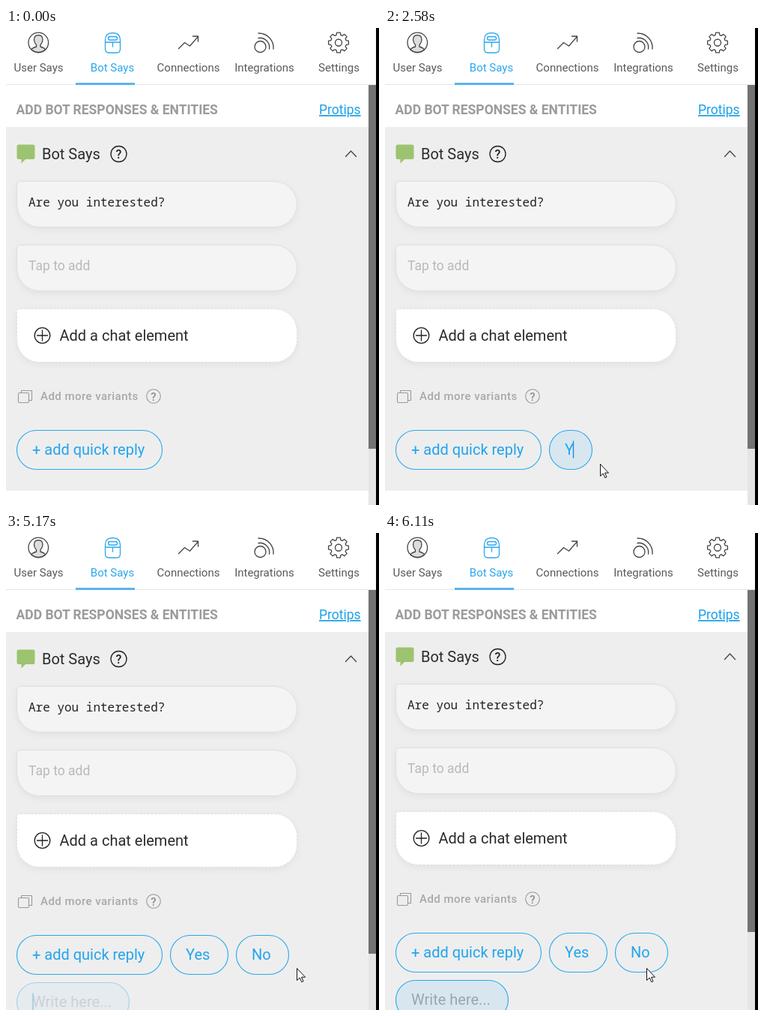
Recreate the animation shown at these times as an HTML page. Size 498 by 636 pixels, loop 6.19 s.

```html
<!DOCTYPE html>
<html lang="en">
<head>
<meta charset="utf-8">
<title>Bot quick replies</title>
<style>
  html, body { margin: 0; width: 100%; height: 100%; overflow: hidden; background: #fff; }
  svg { display: block; width: 498px; height: 636px; font-family: Roboto, Arial, sans-serif; }
  text { white-space: pre; }
  .nav { font-size: 15px; text-anchor: middle; fill: #5a5a5a; }
  .nav .active { fill: #2aa7ee; }
  .icon { fill: none; stroke: #444; stroke-width: 1.3; stroke-linejoin: round; stroke-linecap: round; }
  .big { font-size: 20px; fill: #2b2b2b; }
  .bubble { fill: #f4f4f4; stroke: #dedede; filter: drop-shadow(0 3px 4px rgba(0, 0, 0, .05)); }
  .pill rect { fill: #d8e7ef; stroke: #27a8f0; stroke-width: 1.1; }
  .pill text { font-size: 20px; fill: #21a5ee; }
  .caret { stroke: #1c8fd3; stroke-width: 1.4; }
  .cursor path { stroke-linejoin: round; }
</style>
</head>
<body>
<svg viewBox="0 0 498 636">
  <defs>
    <clipPath id="view"><rect y="132" width="484" height="504"/></clipPath>
  </defs>
  <rect width="498" height="636" fill="#fff"/>

  <g clip-path="url(#view)">
    <g id="page">
      <rect id="panel" y="60" width="484" height="557" fill="#eee"/>
      <path d="M17 155.500H36Q38.500 155.500 38.500 158V172.500Q38.500 175 36 175H26L20.500 180.500V175H17Q14.500 175 14.500 172.500V158Q14.500 155.500 17 155.500Z" fill="#9cc36f"/>
      <text class="big" x="48" y="175">Bot Says</text>
      <g class="icon">
        <circle cx="150.500" cy="168" r="10.500" stroke="#222"/>
        <path d="M453.500 171.500L460.500 164L467.500 171.500"/>
      </g>
      <text x="150.500" y="174" font-size="16" font-weight="500" text-anchor="middle" fill="#222">?</text>

      <path class="bubble" d="M18.500 204.500H358A30.500 30.500 0 0 1 358 265.500H45A30.500 30.500 0 0 1 14.500 235V208.500Q14.500 204.500 18.500 204.500Z"/>
      <text x="30" y="238" font-size="16" fill="#222" style="font-family: 'Noto Sans Mono', monospace">Are you interested?</text>
      <path class="bubble" d="M18.500 289.500H358A30.500 30.500 0 0 1 358 350.500H45A30.500 30.500 0 0 1 14.500 320V293.500Q14.500 289.500 18.500 289.500Z"/>
      <text x="30" y="323" font-size="17.500" fill="#b9b9b9">Tap to add</text>

      <path class="bubble" style="fill: #fff; stroke-dasharray: 3 2" d="M18.500 374.500H358.500A30 30 0 0 1 388.500 404.500V415.500A30 30 0 0 1 358.500 445.500H44.500A30 30 0 0 1 14.500 415.500V378.500Q14.500 374.500 18.500 374.500Z"/>
      <g class="icon" style="stroke: #222">
        <circle cx="48.500" cy="410" r="10.300"/>
        <path d="M41.500 410H55.500M48.500 403V417"/>
      </g>
      <text class="big" x="71.500" y="417">Add a chat element</text>

      <g class="icon" style="stroke: #999; stroke-width: 1.1">
        <rect x="16.500" y="486.500" width="14" height="13" rx="1.500"/>
        <path d="M20.500 486V483.500H34.500V496.500H31"/>
        <circle cx="197" cy="491" r="9.300"/>
      </g>
      <text x="46" y="496" font-size="15" font-weight="500" letter-spacing=".45" fill="#a8a8a8">Add more variants</text>
      <text x="197" y="496.500" font-size="15" font-weight="500" text-anchor="middle" fill="#8c8c8c">?</text>
      <g id="pills"></g>
    </g>
  </g>

  <text x="13.500" y="115" font-size="17.500" font-weight="700" fill="#9b9b9b">ADD BOT RESPONSES &amp; ENTITIES</text>
  <text x="418" y="115" font-size="17.500" fill="#1ba1e8" text-decoration="underline">Protips</text>

  <rect y="75" width="494" height="1" fill="#e6e6e6"/>
  <rect x="93" y="73" width="79" height="3" fill="#5db3ec"/>
  <g class="nav">
    <text x="43.500" y="58">User Says</text>
    <text x="142" y="58" class="active">Bot Says</text>
    <text x="243.500" y="58">Connections</text>
    <text x="345" y="58">Integrations</text>
    <text x="444.500" y="58">Settings</text>
  </g>
  <g class="icon">
    <circle cx="43.300" cy="19.500" r="13.300"/>
    <path fill="#ddd" d="M34 29Q35 26.500 40.500 25V22.500Q37.500 19.500 37.500 15.500Q37.500 9.500 43.300 9.500Q49 9.500 49 15.500Q49 19.500 46 22.500V25Q51.500 26.500 52.500 29Q43.300 36 34 29Z"/>
    <g stroke="#2aa7ee">
      <path d="M132.500 16Q132.500 6.500 142.500 6.500Q152.500 6.500 152.500 16V28Q152.500 33 147.500 33H137.500Q132.500 33 132.500 28Z"/>
      <path d="M132.500 19H152.500M142.500 19V25"/>
      <rect x="136.500" y="11.500" width="12" height="4.500" rx="2.200"/>
    </g>
    <path d="M230.500 27.500L238.500 19.500L245.500 24L256.500 11.500M249.500 11H256.500V18"/>
    <circle cx="339.500" cy="25" r="7.500"/>
    <path d="M337 13.500A12.500 12.500 0 0 1 351.500 28M337 7A19.500 19.500 0 0 1 357 28"/>
    <path id="gear"/>
    <circle cx="444" cy="19.500" r="4.500"/>
  </g>

  <rect x="484" y="76" width="10" height="560" fill="#e5e5e5"/>
  <rect id="thumb" x="484" y="76" width="10" height="485" fill="#737373"/>
  <rect x="494" width="4" height="636" fill="#000"/>

  <circle id="ring" cx="74" cy="559" r="14.300" fill="none" stroke="#333" stroke-width="1.200"/>
  <g class="cursor">
    <path id="arrow" fill="#fff" stroke="#111" d="M.5 .5V16.500L4.200 13L6.800 18.700L9 17.700L6.500 12.200H11.500Z"/>
    <path id="hand" fill="#fff" stroke="#111" d="M-1.500 12.500V1.500Q-1.500 0 0 0Q1.500 0 1.500 1.500V7Q4.500 5.500 5 8Q8 6.500 8.500 9Q11.500 8 11.500 11V15Q11.500 18 9.500 19.500V22H0V19.500L-5.500 13Q-6.500 11 -5 10.300Q-3.500 10 -1.500 12.500Z"/>
    <g id="beam" fill="none">
      <path stroke="#fff" stroke-width="2.500" d="M0 -6V6"/>
      <path stroke="#111" stroke-width="1.200" d="M-3.500 -7.500H-1.500L0 -6.500L1.500 -7.500H3.500M0 -6.500V6.500M-3.500 7.500H-1.500L0 6.500L1.500 7.500H3.500"/>
    </g>
  </g>
</svg>

<script>
const LOOP = 6190;
const $ = id => document.getElementById(id);
const set = (el, attrs) => { for (const k in attrs) el.setAttribute(k, attrs[k]); };
const make = (tag, parent, attrs = {}) => {
  const el = document.createElementNS('http://www.w3.org/2000/svg', tag);
  set(el, attrs);
  return parent.appendChild(el);
};

// Tables hold [start in ms, ...values]; each row lasts until the next.
const pick = (rows, t) => rows.reduce((hit, row) => row[0] <= t ? row : hit, rows[0]);

const POINTER = [
  [0, '', 0, 0], [350, 'arrow', 241, 581], [430, 'hand', 180, 563], [500, 'hand', 119, 546],
  [750, 'hand', 105, 549], [830, 'hand', 86, 555], [900, 'hand', 75, 559],
  [1680, 'hand', 102, 562], [1750, 'hand', 178, 569], [1830, 'beam', 252, 578], [1900, 'beam', 288, 582],
  [2580, 'arrow', 287, 581], [3830, 'beam', 288, 582], [3910, 'beam', 321, 582],
  [3990, 'beam', 364, 582], [4070, 'beam', 389, 582], [4530, 'arrow', 388, 580], [6110, 'arrow', 349, 580]
];
const HOVER = [[0, 0], [430, .6], [500, 1], [1750, .7], [1830, .3], [1900, 0]];
const CARET = [[0, 1], [1900, 0], [2360, 1], [3830, 0], [4390, 1], [5720, 0]];
const SCROLL = [[0, 0], [5250, 10], [5320, 28], [5400, 18], [5480, 11], [5560, 7], [5640, 4], [5720, 3]];
const FADE = [[0, .4], [75, .7], [150, 1]];
const WIDTH = { '': 150, Y: 57, Ye: 67, Yes: 77, N: 59, No: 70 };

const REPLIES = [
  { x: 219.5, y: 536.5, from: 1360, blur: 3280, typed: [[0, ''], [2580, 'Y'], [2730, 'Ye'], [2900, 'Yes']] },
  { x: 307.5, y: 536.5, from: 3280, blur: 5170, typed: [[0, ''], [4530, 'N'], [4620, 'No']] },
  { x: 14.5, y: 599.5, from: 5170, blur: LOOP, typed: [[0, '']] }
];

function makePill(x, y, width, label) {
  const g = make('g', $('pills'), { class: 'pill' });
  const box = make('rect', g, { x, y, width, height: 52, rx: 26 });
  const text = make('text', g, { x: x + 20.5, y: y + 32.5 });
  text.textContent = label;
  const caret = make('line', g, { class: 'caret', y1: y + 14, y2: y + 37, visibility: 'hidden' });
  return { g, box, text, caret };
}

const addButton = makePill(14.5, 536.5, 194, '+ add quick reply');
REPLIES.forEach(r => Object.assign(r, makePill(r.x, r.y, WIDTH[''], '')));

function gearPath(cx, cy) {
  const points = [];
  for (let i = 0; i < 8; i++) {
    for (const [turn, radius] of [[-.28, 10.5], [-.17, 13.6], [.17, 13.6], [.28, 10.5]]) {
      const a = i * Math.PI / 4 + turn;
      points.push((cx + radius * Math.cos(a)).toFixed(1) + ' ' + (cy + radius * Math.sin(a)).toFixed(1));
    }
  }
  return 'M' + points.join('L') + 'Z';
}
set($('gear'), { d: gearPath(444, 19.5) });

function drawReply(r, t) {
  const shown = t >= r.from;
  set(r.g, { opacity: shown ? pick(FADE, t - r.from)[1] : 0 });
  if (!shown) return;
  const value = pick(r.typed, t)[1];
  const width = WIDTH[value];
  const focused = t < r.blur;
  const caretX = value ? r.x + width - 25 : r.x + 21.5;
  set(r.box, { width, 'fill-opacity': focused ? 1 : 0 });
  r.text.textContent = value || 'Write here...';
  r.text.style.fill = value ? '' : '#98a6af';
  set(r.caret, {
    x1: caretX, x2: caretX,
    visibility: focused && (value || pick(CARET, t)[1]) ? 'visible' : 'hidden'
  });
}

function draw(t) {
  set(addButton.box, { 'fill-opacity': pick(HOVER, t)[1] });
  REPLIES.forEach(r => drawReply(r, t));

  const grown = t >= 5170;
  set($('panel'), { height: grown ? 620 : 557 });
  set($('page'), { transform: `translate(0 ${-pick(SCROLL, t)[1]})` });
  const left = 1 - Math.min(1, Math.max(0, (t - 5170) / 550));
  set($('thumb'), { height: Math.round(456 + 29 * left ** 3) });

  set($('ring'), { visibility: t >= 1130 && t < 1270 ? 'visible' : 'hidden' });
  const [, kind, x, y] = pick(POINTER, t);
  for (const id of ['arrow', 'hand', 'beam']) {
    set($(id), { visibility: id === kind ? 'visible' : 'hidden', transform: `translate(${x} ${y})` });
  }
}

const start = performance.now();
function tick() {
  draw((performance.now() - start) % LOOP);
  requestAnimationFrame(tick);
}
tick();
</script>
</body>
</html>
```
